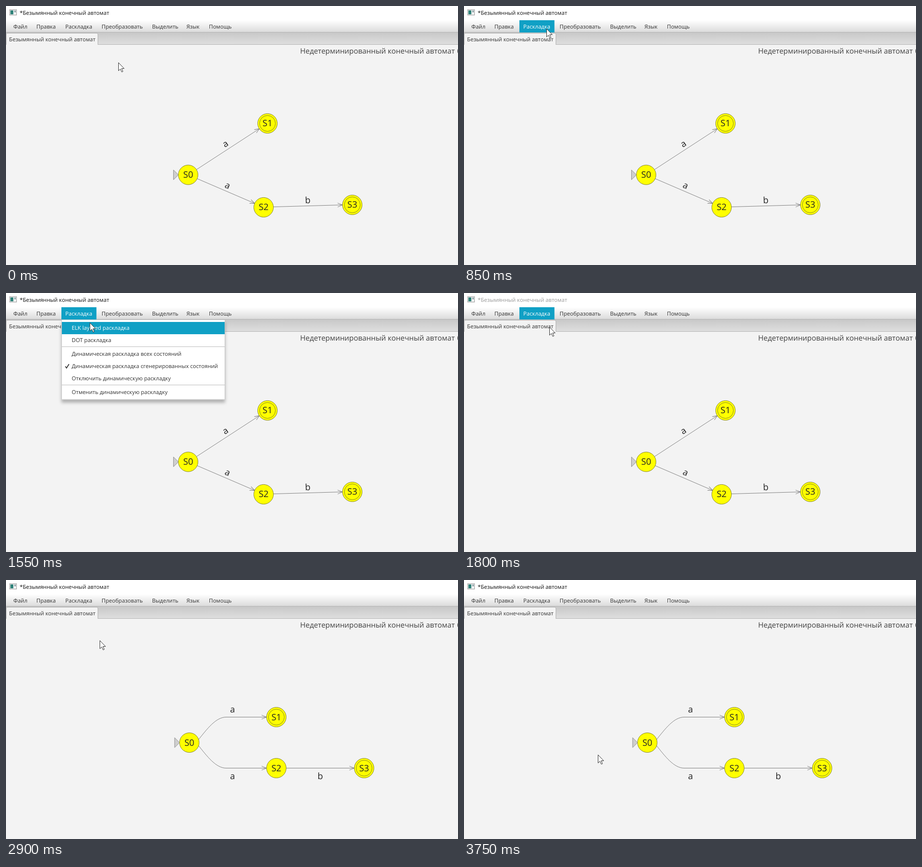
Animation of 922 by 528 pixels, one loop 4.2 s. Source, as an HTML page:

```html
<!DOCTYPE html>
<html lang="ru">
<head>
<meta charset="utf-8">
<title>Конечный автомат</title>
<style>
  html, body { margin: 0; width: 100%; height: 100%; overflow: hidden; background: #f3f3f3; }
  svg { display: block; width: 922px; height: 528px; }
  text { font: 11.170px "Open Sans", "Noto Sans", sans-serif; fill: #333; text-rendering: geometricPrecision; }
  .heading { font-size: 14.950px; fill: #404040; }
  .graph text { font-size: 18px; text-anchor: middle; fill: #222; }
  .graph circle { fill: #ff0; stroke: #6b6b20; stroke-width: .8; }
  .graph path, marker path { fill: none; stroke: #777; stroke-width: .9; }
  .graph .start { fill: #cfcfcf; stroke: #888; }
  .lit { fill: #10a0c5; }
</style>
</head>
<body>
<svg viewBox="0 0 922 528">
  <defs>
    <linearGradient id="barFill" x2="0" y2="1">
      <stop stop-color="#fff"/><stop offset="1" stop-color="#dadada"/>
    </linearGradient>
    <linearGradient id="tabsFill" x2="0" y2="1">
      <stop stop-color="#c8c8c8"/><stop offset="1" stop-color="#dfdfdf"/>
    </linearGradient>
    <marker id="arrow" markerUnits="userSpaceOnUse" markerWidth="14" markerHeight="12"
            refX="11" refY="6" orient="auto"><path d="M1 2 L11 6 L1 10"/></marker>
    <filter id="shadow" x="-10%" y="-10%" width="120%" height="130%">
      <feDropShadow dx="0" dy="6" stdDeviation="3" flood-opacity=".28"/>
    </filter>
  </defs>

  <rect width="922" height="528" fill="#f3f3f3"/>
  <rect width="922" height="29" fill="#fff"/>
  <rect x="7.5" y="7.5" width="14" height="11" fill="#f4f4f4" stroke="#999"/>
  <rect x="9" y="9" width="6" height="8" fill="#2f8279"/>
  <rect x="17" y="9" width="3" height="4" fill="#8fa3a8"/>
  <text id="title" x="28" y="18">*Безымянный конечный автомат</text>

  <rect y="29" width="922" height="25" fill="url(#barFill)"/>
  <rect y="54" width="922" height="25" fill="url(#tabsFill)"/>
  <path d="M0 53.5H922M0 78.5H922" stroke="#b5b5b5"/>
  <path d="M.5 79V58q0-2.500 2.500-2.500H185q2.500 0 2.500 2.500V79" fill="#f3f3f3" stroke="#b0b0b0"/>
  <text x="6.300" y="72">Безымянный конечный автомат</text>
  <rect id="menuLit" class="lit" x="113" y="29" width="71.500" height="25"/>
  <g id="menuBar"></g>

  <text class="heading" x="600" y="97">Недетерминированный конечный автомат</text>
  <text class="heading" x="920" y="97">б</text>

  <g id="before" class="graph"></g>
  <g id="after" class="graph"></g>

  <g id="dropdown">
    <rect x="113.500" y="54.500" width="333" height="162.500" fill="#fff" stroke="#c8c8c8" filter="url(#shadow)"/>
    <path d="M114 109.500H446M114 187.500H446" stroke="#bdbdbd"/>
    <rect id="itemLit" class="lit" x="114" y="59" width="332" height="25"/>
    <path d="M121 149.500l2.500 3.500 5-8" fill="none" stroke="#333" stroke-width="1.700"/>
    <g id="items"></g>
  </g>

  <path id="cursor" d="M0 0V16.500L3.800 13 6.600 19 9 18 6.300 12H11.500Z" fill="#fff" stroke="#333"/>
</svg>
<script>
const el = id => document.getElementById(id);
const label = (x, y, s) => `<text x="${x}" y="${y}">${s}</text>`;

el('menuBar').innerHTML = [
  [15, 'Файл'], [62, 'Правка'], [121, 'Раскладка'], [195, 'Преобразовать'],
  [298, 'Выделить'], [368, 'Язык'], [414, 'Помощь']
].map(([x, s]) => label(x, 46, s)).join('');

el('items').innerHTML = [
  [75, 'ELK layered раскладка'], [100, 'DOT раскладка'],
  [128, 'Динамическая раскладка всех состояний'],
  [153, 'Динамическая раскладка сгенерированных состояний'],
  [178, 'Отключить динамическую раскладку'], [206, 'Отменить динамическую раскладку']
].map(([y, s]) => label(134, y, s)).join('');

// nodes: [x, y], numbered S0..S3; edges: [path, symbol, x, y, angle]
function drawGraph(id, nodes, edges) {
  const [sx, sy] = nodes[0];
  const arrows = edges.map(([d, symbol, x, y, angle]) =>
    `<path d="${d}" marker-end="url(#arrow)"/>
     <text transform="translate(${x} ${y}) rotate(${angle})" y="6">${symbol}</text>`);
  const states = nodes.map(([x, y], i) =>
    `<circle cx="${x}" cy="${y}" r="20"/>` +
    (i % 2 ? `<circle cx="${x}" cy="${y}" r="16.200"/>` : '') + label(x, y + 6, 'S' + i));
  el(id).innerHTML =
    `<path class="start" d="M${sx - 30} ${sy - 10}v20l10-10z"/>` + arrows.join('') + states.join('');
}

drawGraph('before', [[371.6, 344.2], [533.4, 239.4], [525.5, 410.4], [706.4, 405.4]], [
  ['M388.500 333.500L517 250', 'a', 447.5, 281, -33],
  ['M390 352L507.500 402.500', 'a', 452, 366, 23],
  ['M545 409.500L686.500 405.500', 'b', 615.5, 396, -2]
]);
drawGraph('after', [[374, 331.5], [551.5, 279.5], [551.5, 383.5], [730.5, 383.5]], [
  ['M393 325C410 304 428 279.500 449 279.500H531.500', 'a', 462, 264, 0],
  ['M393 338C410 359 428 383.500 449 383.500H531.500', 'a', 462, 399.5, 0],
  ['M571 383.500H710.500', 'b', 641, 400, 0]
]);

// pointer waypoints: [time, x, y]
const route = [
  [250, 229, 115], [450, 215, 96], [650, 191, 66], [850, 168, 46], [1000, 164, 42],
  [1350, 164, 42], [1500, 169, 56], [1650, 174, 69], [1800, 174, 69], [2250, 179, 75],
  [2450, 186, 103], [2600, 191, 123], [2900, 191, 123], [3150, 211, 180],
  [3400, 243, 260], [3600, 264, 328], [3750, 273, 356]
];

function pointerAt(t) {
  const next = route.findIndex(p => p[0] > t);
  if (next === 0) return route[0].slice(1);
  if (next < 0) return route[route.length - 1].slice(1);
  const [t0, x0, y0] = route[next - 1], [t1, x1, y1] = route[next];
  const k = (t - t0) / (t1 - t0);
  return [x0 + (x1 - x0) * k, y0 + (y1 - y0) * k];
}

const show = (id, on) => el(id).style.display = on ? '' : 'none';
const paint = (node, on) => node.style.fill = on ? '#fff' : '';

function render(now) {
  const t = Math.floor(now % 4200 / 50) * 50;
  const [x, y] = pointerAt(t);
  const menuLit = t >= 800 && t < 1850;
  const itemLit = t >= 1550 && t < 1800;
  const arranged = t >= 1900;
  show('menuLit', menuLit);
  paint(el('menuBar').children[2], menuLit);
  show('dropdown', t >= 950 && t < 1800);
  show('itemLit', itemLit);
  paint(el('items').children[0], itemLit);
  show('before', !arranged);
  show('after', arranged);
  el('title').style.fill = t === 1800 ? '#999' : '#111';
  el('cursor').setAttribute('transform', `translate(${x + .5} ${y + .5})`);
}

const begin = performance.now();
function frame() {
  render(performance.now() - begin);
  requestAnimationFrame(frame);
}
frame();
</script>
</body>
</html>
```
